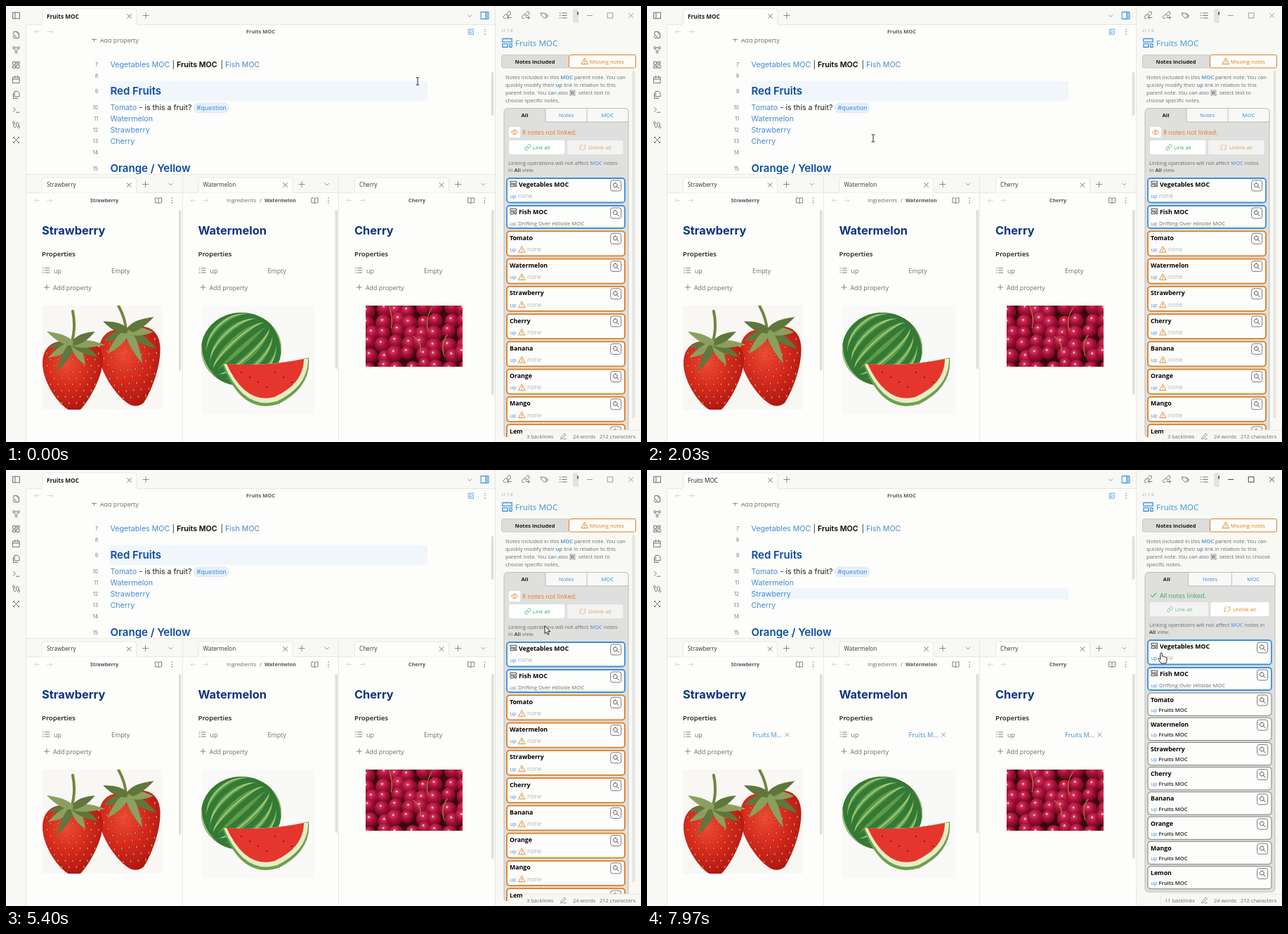
An HTML page that plays this animation: 904x620 px, repeating every 8000 ms.

```html
<!DOCTYPE html>
<html lang="en">
<head>
<meta charset="utf-8">
<title>Linking notes</title>
<style>
  html, body { margin: 0; width: 100%; height: 100%; overflow: hidden; background: #fdfdfb; }
  svg { display: block; width: 904px; height: 620px; }
  text { white-space: pre; }
  .ui { font-family: "Open Sans", "Noto Sans", sans-serif; }
  .doc { font-family: Inter, Roboto, sans-serif; }
</style>
</head>
<body>
<svg id="stage" viewBox="0 0 904 620"></svg>
<script>
const BLUE = '#4189d8', SKY = '#3d8fd9', ORANGE = '#e07d1c', GREEN = '#2fae55';
const INK = '#1c1c1c', GREY = '#6c6c6c', PALE = '#b4b4b2', CHROME = '#f8f8f5', PAGE = '#fdfdfb', LINE = '#e6e6e2';

const ICONS = {
  panelLeft: 'M3 4h18v16H3zM9 4v16',
  panelRight: 'M2 3h20v18H2zM15 3v18M18 7h1M18 11h1M18 15h1',
  fileSearch: 'M5 11V3h10l5 5v13h-7M15 3v5h5M7 13a4 4 0 1 0 .01 0M10 20l3 3',
  graph: 'M5 3a3 3 0 1 0 .01 0M19 3a3 3 0 1 0 .01 0M12 16a3 3 0 1 0 .01 0M6 9l5 7M18 9l-5 7M8 6h8',
  grid: 'M3 3h7v8H3zM14 3h7v5h-7zM14 12h7v9h-7zM3 15h7v6H3z',
  calendar: 'M3 4h18v17H3zM3 10h18M8 1v5M16 1v5',
  copy: 'M8 2h8l5 5v10H8zM4 7v15h12',
  terminal: 'M4 17l6-6-6-6M12 19h9',
  branch: 'M5 3a3 3 0 1 0 .01 0M19 15a3 3 0 1 0 .01 0M5 9v8a4 4 0 0 0 7 0V7a4 4 0 0 1 7 0v8',
  tools: 'M4 4l16 16M20 4L4 20M3 7l4-4M17 21l4-4M17 3l4 4M3 17l4 4',
  close: 'M5 5l14 14M19 5L5 19',
  plus: 'M12 3v18M3 12h18',
  chevron: 'M5 9l7 7 7-7',
  back: 'M21 12H3M10 5l-7 7 7 7',
  next: 'M3 12h18M14 5l7 7-7 7',
  edit: 'M12 4H3v17h17v-9M18 2l4 4-10 10H8v-4z',
  pen: 'M17 3l4 4L8 20l-5 1 1-5zM13 21h8',
  dots: 'M12 4v.1M12 12v.1M12 20v.1',
  book: 'M12 6C10 4 6 4 2 4v15c4 0 8 0 10 2 2-2 6-2 10-2V4c-4 0-8 0-10 2v15',
  list: 'M9 5h13M9 12h13M9 19h13M2 5h2M2 12h2M2 19h2',
  link: 'M10 13a5 5 0 0 0 7.5.5l3-3a5 5 0 0 0-7-7l-1.7 1.7M14 11a5 5 0 0 0-7.5-.5l-3 3a5 5 0 0 0 7 7l1.7-1.7',
  unlink: 'M15 6l2-2a4 4 0 0 1 5 5l-4 4M9 18l-2 2a4 4 0 0 1-5-5l4-4M8 2v3M2 8h3M16 19v3M19 16h3',
  linkIn: 'M9 12a5 5 0 0 0 7 0l4-4a4 4 0 0 0-6-6l-2 2M13 9a5 5 0 0 0-7 0l-4 4a4 4 0 0 0 4 7M22 18H11M15 14l-4 4 4 4',
  linkOut: 'M9 12a5 5 0 0 0 7 0l4-4a4 4 0 0 0-6-6l-2 2M13 9a5 5 0 0 0-7 0l-4 4a4 4 0 0 0 4 7M11 18h11M18 14l4 4-4 4',
  tags: 'M2 5h8l8 8-7 7-9-9zM6 9v.1M14 5l8 8-6 7',
  layout: 'M2 3h20v7H2zM2 14h11v7H2zM17 14h5v7h-5z',
  warn: 'M12 3L22 21H2zM12 10v5M12 18v.1',
  eye: 'M2 12s4-7 10-7 10 7 10 7-4 7-10 7-10-7-10-7M12 9a3 3 0 1 0 .01 0',
  check: 'M21 5L9 18l-6-6',
  search: 'M10 3a7 7 0 1 0 .01 0M15 15l7 7',
  select: 'M2 6V2h4M18 2h4v4M22 18v4h-4M6 22H2v-4M7 7h10v10H7zM10 10h4v4h-4zM11 2h2M11 22h2M2 11v2M22 11v2',
  minimise: 'M4 12h16', maximise: 'M4 4h16v16H4z'
};

const text = (x, y, s, size, fill = INK, weight = 400, cls = 'ui', anchor = 'start') =>
  `<text class="${cls}" x="${x}" y="${y}" font-size="${size}" fill="${fill}" font-weight="${weight}" text-anchor="${anchor}">${s}</text>`;
const doc = (x, y, s, fill = INK, weight = 400, size = 10.67) => text(x, y, s, size, fill, weight, 'doc');
const rect = (x, y, w, h, fill, stroke = 'none', r = 0, sw = 1) =>
  `<rect x="${x}" y="${y}" width="${w}" height="${h}" rx="${r}" fill="${fill}" stroke="${stroke}" stroke-width="${sw}"/>`;
const path = (d, fill, stroke = 'none', sw = 1) =>
  `<path d="${d}" fill="${fill}" stroke="${stroke}" stroke-width="${sw}" stroke-linecap="round" stroke-linejoin="round"/>`;
const icon = (name, cx, cy, size, color = GREY, sw = 1.9) =>
  `<g transform="translate(${cx - size / 2} ${cy - size / 2}) scale(${size / 24})">${path(ICONS[name], 'none', color, sw)}</g>`;
const group = (attrs, body) => `<g ${attrs}>${body}</g>`;
const clip = (id, body) => `<clipPath id="${id}">${body}</clipPath>`;
const glow = (id, inner, mid, outer) => `<radialGradient id="${id}" cx=".4" cy=".32" r=".72"><stop offset="0" stop-color="${inner}"/>` +
  `<stop offset=".45" stop-color="${mid}"/><stop offset="1" stop-color="${outer}"/></radialGradient>`;
const range = n => [...Array(n).keys()];

function seeded(seed) {
  return () => (seed = (seed * 16807) % 2147483647) / 2147483647;
}

function tab(x, y, h) {
  return path(`M${x - 4} ${y + h}q4 0 4-4v${8 - h}q0-4 4-4h126q4 0 4 4v${h - 8}q0 4 4 4`, PAGE, LINE) +
    icon('close', x + 123.5, y + 10.5, 10, '#555') + icon('plus', x + 147, y + 9.5, 11, GREY, 1.7);
}

function chrome() {
  const side = ['fileSearch', 'graph', 'grid', 'calendar', 'copy', 'terminal', 'branch', 'tools'];
  return rect(0, 0, 904, 620, CHROME) + rect(29, 27, 668, 212, PAGE) + rect(29, 265, 668, 355, PAGE) +
    path('M28.5 27V620M696.5 0V620M29 26.5H697M29 239.5H697M29 265.5H697M251.5 240V620M473.5 240V620', 'none', LINE) +
    icon('panelLeft', 14.5, 13.5, 13) + side.map((n, i) => icon(n, 14.5, 41 + i * 21.35, 12)).join('') +
    tab(52, 4, 23) + icon('chevron', 660, 14, 9) +
    rect(682, 9.5, 4.5, 8.5, '#cfe2f6') + icon('panelRight', 681.5, 13.5, 13, SKY) +
    icon('back', 44, 36.5, 9, '#c4c4c2') + icon('next', 63, 36.5, 9, '#c4c4c2') +
    icon('edit', 662, 36.5, 10, SKY) + icon('dots', 682, 36.5, 10, GREY, 3.5) +
    ['linkIn', 'linkOut', 'tags', 'list'].map((n, i) => icon(n, 714 + i * 26.4, 13.5, 12)).join('') +
    path('M815 4h-5q-3 0-3 3v14q0 3 3 3h5z', '#e3e3e0') + path('M814 9v3', 'none', '#333', 1.5);
}

const LINKS = [[148.5, 233, 86.5], [312, 361, 86.5], [148.5, 187, 148], [148.5, 209, 164], [148.5, 204.5, 180], [148.5, 183, 196]];

function editor() {
  const numbers = [[7, 85.5], [8, 101.5], [9, 123.5], [10, 147], [11, 163], [12, 179], [13, 195], [14, 211], [15, 233.5]];
  const heading = (y, s) => doc(148.5, y, s, '#0b4aa0', 600, 15);
  return group('clip-path="url(#editorClip)"',
    `<rect id="activeLine" x="148" width="452" fill="#f0f6fb"/>` +
    icon('plus', 125.5, 47.5, 9) + text(134, 51.5, 'Add property', 8.9, GREY) +
    numbers.map(([n, y]) => text(131, y, n, 7, '#757575', 400, 'doc', 'end')).join('') +
    doc(148.5, 86.5, 'Vegetables MOC', BLUE) + doc(236.5, 86.5, '|') + doc(243, 86.5, 'Fruits MOC', '#000', 600) +
    doc(305.5, 86.5, '|') + doc(312, 86.5, 'Fish MOC', BLUE) +
    heading(126.4, 'Red Fruits') + doc(148.5, 148, 'Tomato', BLUE) + doc(189.5, 148, '- is this a fruit?') +
    rect(267.5, 138, 49.5, 13.5, '#e6f1fb', '#cfe2f3', 6.7, .7) + doc(271.5, 147.8, '#question', BLUE, 400, 9) +
    doc(148.5, 164, 'Watermelon', BLUE) +
    group('id="plainLink"', doc(148.5, 180, 'Strawberry', BLUE)) +
    group('id="rawLink"', doc(148.5, 180, `[[<tspan fill="${BLUE}">Strawberry</tspan>]]`, '#777')) +
    `<rect id="caret" x="219.2" y="169.5" width="1" height="13" fill="#111"/>` +
    doc(148.5, 196, 'Cherry', BLUE) + heading(236.3, 'Orange / Yellow') +
    `<path id="underline" stroke="${BLUE}" stroke-width=".8"/>`) +
    rect(690.7, 94, 3.6, 62, '#dededb', 'none', 1.8);
}

function pane(x, name, folder, barHeight) {
  const header = folder
    ? text(x + 40.5, 279.3, folder, 8, GREY) + text(x + 87.5, 279.3, '/', 8, GREY) + text(x + 94.5, 279.3, name, 7.25, '#555', 700)
    : text(x + 89, 279.3, name, 7.25, '#555', 700, 'ui', 'middle');
  return tab(x + .5, 244, 21.5) + text(x + 7, 257, name, 8.15, '#333') + icon('chevron', x + 183.5, 253.5, 9) +
    icon('back', x - 7, 276.5, 9, '#c9c9c6') + icon('next', x + 11, 276.5, 9, '#c9c9c6') + header +
    icon('book', x + 166, 276.5, 11) + icon('dots', x + 185.5, 276.5, 10, GREY, 3.5) +
    doc(x, 324.8, name, '#0c3480', 700, 16.4) + text(x, 356, 'Properties', 9.6, INK, 600) +
    icon('list', x + 6, 376, 11) + text(x + 17, 380, 'up', 8.85, GREY) +
    group('class="before"', text(x + 99, 380, 'Empty', 8.85, GREY)) +
    group('class="after"', text(x + 99, 380, 'Fruits M...', 9.2, BLUE) + icon('close', x + 148.5, 376.5, 9)) +
    icon('plus', x + 7, 400, 10) + text(x + 16, 404, 'Add property', 8.9, GREY) +
    rect(x + 195, 290, 3.6, barHeight, '#dededb', 'none', 1.8);
}

function strawberry(transform, leafAngles) {
  const seeds = range(9).flatMap(r => range(8).map(c => {
    const y = 14 + r * 8.8, half = 44 * Math.sqrt(1 - (y / 104) ** 2) - 5;
    const x = (c - 3.5 + (r % 2) * .5) * 10.5;
    return Math.abs(x) < half ? `<ellipse cx="${x}" cy="${y}" rx="1.2" ry="1.9" fill="#e5a04a" stroke="#a5150f" stroke-width=".7"/>` : '';
  })).join('');
  const leaves = leafAngles.map((a, i) =>
    `<path transform="rotate(${a})" d="M0-3Q14-10 ${36 + i % 3 * 5} 0Q14 9 0 3" fill="${i % 2 ? '#8ba05f' : '#5f763c'}"/>`).join('');
  return group(`transform="${transform}"`,
    path('M0 3C16-10 44-4 43 24C42 48 24 80 12 93Q2 99-8 93C-24 82-43 52-43 28C-43-2-16-10 0 3Z', 'url(#berryFill)') + seeds + leaves);
}

function strawberryPhoto() {
  return group('clip-path="url(#photoA)"', rect(52, 426, 170, 148, '#f9f7f3') +
    path('M160 426Q170 444 171 462M95 434Q100 458 93 480', 'none', '#74863f', 4) +
    strawberry('translate(173 462) rotate(-6) scale(1.02 1.12)', [165, 140, 35, 8, -20, 70, 205]) +
    strawberry('translate(95 480)', [172, 150, 120, 60, 28, 2, -28, 205]));
}

function melonPhoto() {
  const stripe = (k, color, width) =>
    `<ellipse cx="335" cy="487" rx="${58 * k}" ry="55" fill="none" stroke="${color}" stroke-width="${width}"/>`;
  const stripes = [.12, .4, .66, .9].map(k => stripe(k, '#347a35', 8) + stripe(k + .13, '#a2c97e', 2)).join('');
  return rect(278, 426, 162, 155, '#f9f9f7') +
    group('clip-path="url(#melon)"', rect(275, 430, 120, 115, '#5f9c48') + group('transform="rotate(48 335 487)"', stripes)) +
    path('M308 509Q370 514 431 500Q435 542 388 566Q335 582 308 509Z', '#6f9f4c') +
    path('M310 509Q370 513 430 501Q431 540 386 562Q338 576 310 509Z', '#e6edc4') +
    path('M314 509Q370 513 424 502Q424 537 382 556Q341 567 314 509Z', '#e5362d') +
    range(7).map(i => `<circle cx="${335 + i * 12}" cy="${521 + i * 5 % 4 * 7}" r="1" fill="#511"/>`).join('');
}

function cherryPhoto() {
  const rnd = seeded(91);
  const fruit = range(48).map(i => {
    const x = 514 + (i % 8) * 19 + rnd() * 9, y = 427 + Math.floor(i / 8) * 16.5 + rnd() * 8, r = 9.5 + rnd() * 2.5;
    return `<circle cx="${x}" cy="${y}" r="${r}" fill="url(#cherryFill)"/><circle cx="${x - 2}" cy="${y - 4}" r="1.4" fill="#f3c3cf"/>`;
  }).join('');
  return group('clip-path="url(#photoC)"', rect(512, 426, 138, 87, '#3c050d') + fruit +
    path('M545 426Q552 445 548 458M606 430Q596 446 601 462M580 470Q592 478 590 492M628 468Q618 480 624 498', 'none', '#a98545', 1.2));
}

function panelTop() {
  const strong = s => `<tspan fill="${BLUE}" font-weight="600">${s}</tspan>`;
  return text(705, 36.5, 'v1.1.9', 6, '#9a9a98') + icon('layout', 713.5, 52.5, 16, SKY) +
    text(725, 57, 'Fruits MOC', 11.6, SKY) +
    rect(705.5, 69.5, 96, 18.5, '#dcdcda', '#c9c9c6', 3) + text(753, 81.5, 'Notes included', 7.6, INK, 700, 'ui', 'middle') +
    rect(801.5, 69.5, 95, 18.5, PAGE, ORANGE, 2) + icon('warn', 824, 78.5, 11, ORANGE) + text(831, 81.5, 'Missing notes', 7.67, ORANGE) +
    text(711, 103.8, `Notes included in this ${strong('MOC')} parent note. You can`, 7.57, GREY) +
    text(711, 114.8, `quickly modify their ${strong('up')} link in relation to this`, 7.57, GREY) +
    text(711, 125.8, 'parent note. You can also', 7.57, GREY) + icon('select', 806.5, 123.5, 8.5, '#555');
}

function card(top, height, right, stroke, sw, body) {
  return rect(713, top, right - 5 - 713, height, '#fdfdfc', stroke, 4, sw) +
    rect(right - 25.3, top + 3, 15, 15, '#fff', '#777', 3) + icon('search', right - 17.8, top + 10.5, 10, '#222') + body;
}

function panel(linked) {
  const right = linked ? 894 : 886, up = linked ? 3 : 0, bottom = linked ? 600 : 613;
  const third = (right - 709) / 3, buttonW = linked ? 83 : 79.5;
  const button = (x, name, iconShift, label, color, on) => group(`opacity="${on ? 1 : .65}"`,
    rect(x, 191 - up, buttonW, 20, '#fff', 'none', 3) + icon(name, x + buttonW / 2 - iconShift, 201 - up, 10, color) +
    text(x + buttonW / 2 + 6.5, 203.8 - up, label, 7.6, color, 400, 'ui', 'middle'));
  const blueWord = `<tspan fill="${BLUE}">MOC</tspan>`, strong = '<tspan font-weight="600" fill="#333">All</tspan>';

  let s = text(815, 125.8, linked ? 'select text to choose' : 'select text to', 7.57, GREY) +
    text(711, 136.8, linked ? 'specific notes.' : 'choose specific notes.', 7.57, GREY) +
    rect(709, 145.5, right - 709, bottom - 145.5, '#dfdfdd', '#bcbcba', 5) +
    path(`M${709 + third} 164.5v-19H${right - 5}q5 0 5 5v14z`, '#f8f8f6', '#bcbcba') + path(`M${709 + 2 * third} 146v18`, 'none', '#bcbcba') +
    ['All', 'Notes', 'MOC'].map((n, i) => text(709 + third * (i + .5), 158, n, 7.7, i ? BLUE : INK, i ? 400 : 700, 'ui', 'middle')).join('');
  s += linked
    ? icon('check', 721, 178, 10, GREEN, 2.5) + text(730, 181.5, 'All notes linked.', 9, GREEN)
    : rect(716, 172, 16, 15, '#fff', 'none', 3) + icon('eye', 724, 179.5, 11, ORANGE) + text(735, 183, '8 notes not linked.', 9, ORANGE);
  s += button(716, 'link', 13, 'Link all', GREEN, !linked) + button(719.5 + buttonW, 'unlink', 18, 'Unlink all', ORANGE, linked) +
    text(715, 225.8 - up, `Linking operations will not affect ${blueWord} notes${linked ? ' in' : ''}`, 7.57, GREY) +
    text(715, 236.3 - up, `${linked ? '' : 'in '}${strong} view.`, 7.57, GREY);

  const mocCard = (top, h, title, note, fill, size) => card(top - up, h, right, SKY, 1.8,
    icon('layout', 722.5, top - up + 8, 10, INK) + text(730, top - up + 12.2, title, 8.8, '#000', 700) +
    text(717.5, top - up + 27.5, 'up', 7.4, BLUE) + text(729, top - up + 27.5, note, size, fill));
  s += mocCard(245, 34.5, 'Vegetables MOC', 'none', PALE, 8.5) +
    mocCard(284, 32, 'Fish MOC', 'Drifting Over Hillside MOC', GREY, 7.7);

  const names = ['Tomato', 'Watermelon', 'Strawberry', 'Cherry', 'Banana', 'Orange', 'Mango', 'Lemon'];
  s += names.map((name, i) => {
    const top = linked ? 317 + i * 35.2 : 320.3 + i * 39.25, base = top + (linked ? 26.7 : 28.7);
    const state = linked ? text(728.5, base, 'Fruits MOC', 7.7, '#222', 600)
      : icon('warn', 734.5, base - 3, 11, ORANGE) + text(742, base, 'none', 8.5, PALE);
    return card(top, linked ? 32.3 : 35, right, linked ? '#7d7d7b' : ORANGE, linked ? 1 : 1.8,
      text(717, top + 12.6, name, 8.75, '#000', 700) + text(717.5, base, 'up', 7.4, BLUE) + state);
  }).join('');
  s = group('clip-path="url(#panelClip)"', s);
  if (!linked) s += rect(891.5, 92, 4, 494, '#e4e4e1', 'none', 2);

  const barLeft = linked ? 731 : 735;
  s += path(`M${barLeft} 620v-13q0-4 4-4H904v17z`, '#f7f7f4', LINE) +
    text(barLeft + 6, 615, linked ? '11 backlinks' : '3 backlinks', 7.5, GREY) + icon('pen', 793.5, 612, 10) +
    text(807, 615, '24 words', 7.5, GREY) + text(845, 615, '212 characters', 7.5, GREY);
  return group(`class="${linked ? 'after' : 'before'}"`, s);
}

const POINTERS = {
  arrow: path('M0 0V10.5L2.5 8.3L4.2 12.2L6 11.4L4.3 7.7H7.6Z', '#fff', '#111', .9),
  hand: path('M-1.3 1.3Q-1.3 0 0 0T1.3 1.3V5Q3.3 4.3 3.8 5.6Q5.5 5 6 6.3Q7.8 6 8 7.5V10.5Q8 13 6.6 15H.2Q-1 14-1.6 12.7L-4 9.2Q-4.2 7.5-2.5 7.8L-1.3 9Z', '#fff', '#111', .9),
  beam: path('M-2-5.2h1.4L0-4.6L.6-5.2H2M0-4.6V4.6M-2 5.2h1.4L0 4.6L.6 5.2H2', 'none', '#111', .9),
  resize: path('M-1-5V5M1-5V5M-2.5 0H-6.5M2.5 0H6.5M-5-1.8L-7 0L-5 1.8M5-1.8L7 0L5 1.8', 'none', '#111', 1.1)
};

const stage = document.getElementById('stage');
stage.innerHTML = `<defs>${clip('editorClip', rect(29, 46.7, 667, 192, '#000'))}${clip('panelClip', rect(697, 90, 207, 523, '#000'))}
  ${clip('photoA', rect(52, 426, 170, 148, '#000'))}${clip('photoC', rect(512, 426, 138, 87, '#000'))}
  ${clip('melon', '<ellipse cx="335" cy="488" rx="57" ry="52"/>')}
  ${glow('berryFill', '#ee4c35', '#d92b1f', '#a8150f')}${glow('cherryFill', '#d8436a', '#ad1139', '#5c0719')}</defs>` +
  chrome() + group('id="tabName"', text(58, 18, 'Fruits MOC', 8.3, INK, 'inherit')) +
  group('id="viewName"', text(362.5, 39.3, 'Fruits MOC', 7.4, 'inherit', 700, 'ui', 'middle')) +
  group('id="controls"', ['minimise', 'maximise', 'close'].map((n, i) => icon(n, 831 + i * 29.3, 13.5, 11, 'inherit', 1.8)).join('')) +
  editor() + pane(51, 'Strawberry', '', 229) + pane(273.5, 'Watermelon', 'Ingredients', 226) + pane(496, 'Cherry', '', 263) +
  strawberryPhoto() + melonPhoto() + cherryPhoto() + panelTop() + panel(false) + panel(true) + '<g id="pointer"></g>';

// Pointer stops: time, x, y
const STOPS = [
  [0, 586, 107], [70, 586, 107], [330, 470, 145], [620, 250, 165], [870, 200, 183], [900, 200, 183], [1120, 156, 164],
  [1420, 680, 193], [1700, 310, 186], [1730, 310, 186], [2030, 322, 188], [2300, 215, 260], [2530, 142, 336], [2570, 142, 336],
  [2850, 112, 385], [3120, 160, 376], [3370, 228, 414], [3400, 228, 414], [3700, 50, 378], [3960, 170, 376], [4200, 432, 400],
  [4230, 432, 400], [4420, 290, 376], [4650, 575, 480], [4870, 640, 378], [5170, 640, 378], [5400, 767, 222], [5480, 762, 215],
  [5800, 250, 177], [6030, 250, 177], [6430, 698, 205], [6620, 790, 212], [6770, 752, 209], [6870, 752, 209],
  [7130, 748, 199], [7470, 748, 199], [7720, 745, 220], [7970, 732, 260], [8000, 732, 260]
];
const FOCUS = 5860, CLICK = 7470, LINKED = 7610, LOOP = 8000;

function pointerAt(t) {
  const i = Math.max(1, STOPS.findIndex(s => s[0] > t));
  const [t0, x0, y0] = STOPS[i - 1], [t1, x1, y1] = STOPS[i];
  const k = (t - t0) / (t1 - t0), e = k * k * (3 - 2 * k);
  return [x0 + (x1 - x0) * e, y0 + (y1 - y0) * e];
}

function pointerKind(x, y, link) {
  if (Math.abs(x - 697) < 4) return 'resize';
  if (link) return 'hand';
  if (x > 120 && x < 690 && y > 47 && y < 238) return 'beam';
  const overButton = x > 716 && x < 880 && y > 190 && y < 211;
  return overButton || (x > 713 && x < 881 && y > 243) ? 'hand' : 'arrow';
}

const $ = id => document.getElementById(id);
const show = (el, on) => { el.style.display = on ? '' : 'none'; };
const before = document.querySelectorAll('.before'), after = document.querySelectorAll('.after');
let kind = '';

function draw(t) {
  const [x, y] = pointerAt(t), focused = t >= FOCUS, editing = focused && t < CLICK;
  const link = LINKS.find(([a, b, base]) => x > a && x < b && y > base - 12 && y < base + 4);
  const nextKind = pointerKind(x, y, link);
  if (nextKind !== kind) $('pointer').innerHTML = POINTERS[kind = nextKind];
  $('pointer').setAttribute('transform', `translate(${x.toFixed(1)} ${y.toFixed(1)})`);
  $('underline').setAttribute('d', link ? `M${link[0]} ${link[2] + 1.6}H${link[1]}` : '');
  $('activeLine').setAttribute('y', focused ? 168 : 107);
  $('activeLine').setAttribute('height', focused ? 16 : 28);
  $('controls').setAttribute('stroke', focused ? '#222' : '#8a8a8a');
  $('viewName').setAttribute('fill', editing ? '#111' : '#5a5a5a');
  $('tabName').setAttribute('font-weight', t < CLICK ? 700 : 400);
  show($('rawLink'), editing);
  show($('plainLink'), !editing);
  show($('caret'), editing && (t - FOCUS) % 1200 < 600);
  before.forEach(el => show(el, t < LINKED));
  after.forEach(el => show(el, t >= LINKED));
}

const start = performance.now();
function tick() {
  draw((performance.now() - start) % LOOP);
  requestAnimationFrame(tick);
}
tick();
</script>
</body>
</html>
```
